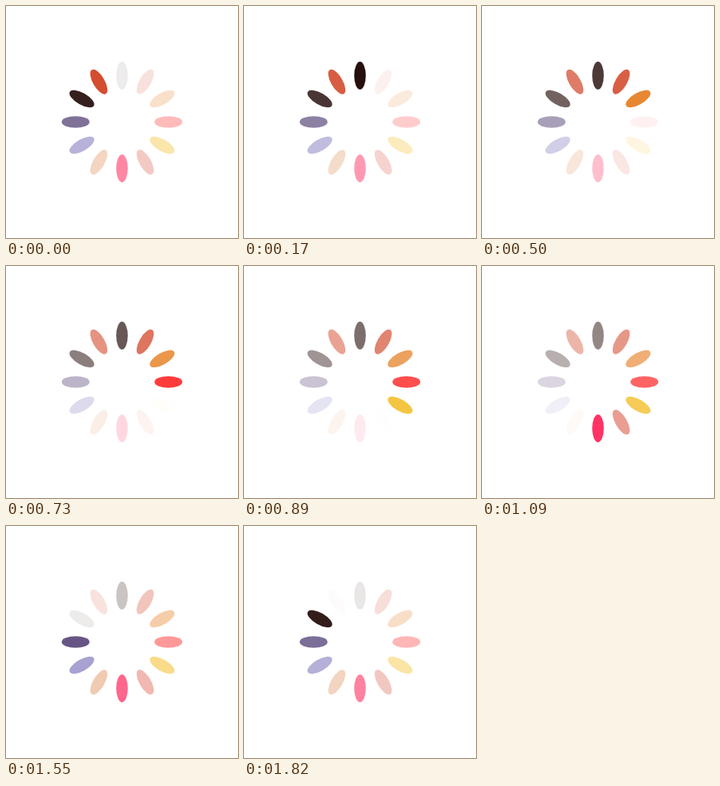
Recreate the animation shown at these times as an HTML page. Size 291x291 px, loop 1.85 s.

```html
<!DOCTYPE html>
<html lang="en">
<head>
<meta charset="utf-8">
<title>Spinner</title>
<style>
  html, body { margin: 0; width: 100%; height: 100%; overflow: hidden; background: #fff; }
  svg { display: block; width: 100vw; height: 100vh; }
</style>
</head>
<body>
<svg id="stage" viewBox="0 0 100 100"></svg>
<script>
  const LOOP = 1850, STEPS = 56, PETALS = 12;
  const COLORS = ['#240d0a', '#d44d30', '#e7852e', '#ff3030', '#f4c134',
                  '#e89488', '#ff3163', '#edc0a4', '#9f99cd', '#665584'];
  const stage = document.getElementById('stage');

  const petals = Array.from({ length: PETALS }, (_, i) => {
    const el = document.createElementNS('http://www.w3.org/2000/svg', 'ellipse');
    const attrs = { cx: 50, cy: 30, rx: 2.5, ry: 6,
                    fill: COLORS[i % COLORS.length],
                    transform: `rotate(${i * 360 / PETALS} 50 50)` };
    for (const name in attrs) el.setAttribute(name, attrs[name]);
    return stage.appendChild(el);
  });

  // Steps begin on the nearest 10 ms.
  const stepStart = k => Math.round(k * LOOP / STEPS / 10) * 10;

  function stepAt(time) {
    let k = STEPS - 1;
    while (k > 0 && stepStart(k) > time) k--;
    return k;
  }

  // Each petal lights up in turn, then fades linearly over one loop.
  function draw(time) {
    const phase = stepAt(time % LOOP) / STEPS;
    petals.forEach((el, i) => {
      const start = (i + 1) % PETALS / PETALS;
      el.setAttribute('opacity', 1 - (phase - start + 1) % 1);
    });
  }

  const begin = performance.now();
  function tick() {
    draw(Math.max(0, performance.now() - begin));
    requestAnimationFrame(tick);
  }
  draw(0);
  requestAnimationFrame(tick);
</script>
</body>
</html>
```
